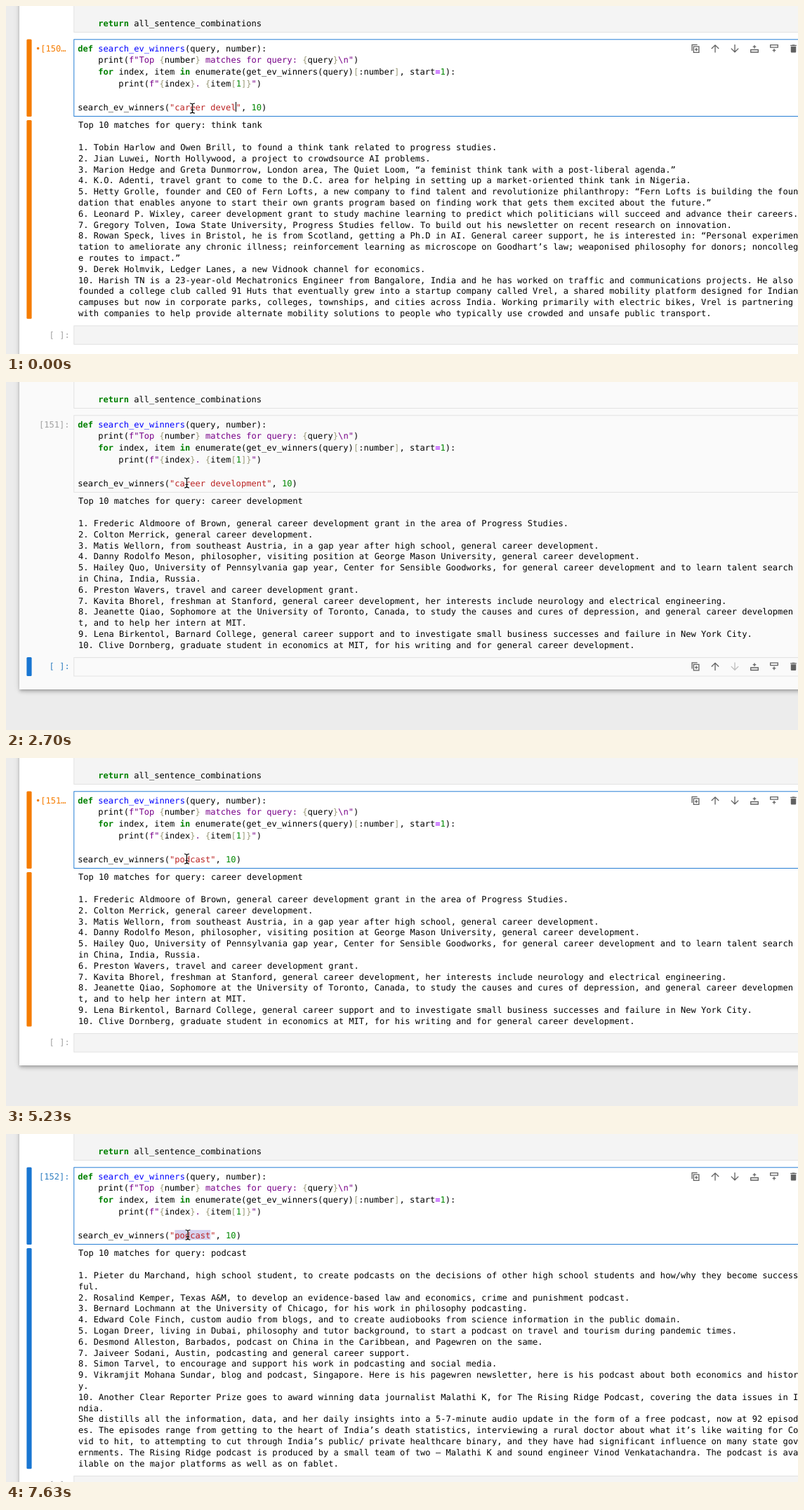
Write an HTML page that moves like this. It is 1128x497 px and loops after 8 s.

```html
<!DOCTYPE html>
<html lang="en">
<head>
<meta charset="utf-8">
<title>Notebook search</title>
<style>
html, body { margin: 0; width: 100%; height: 100%; overflow: hidden; background: #ececec; }
#stage { position: fixed; inset: 0; overflow: hidden; }
#panel {
  position: absolute; left: 19px; width: 100%; top: -30px; background: #fff;
  box-shadow: 0 2px 4px -1px rgba(0,0,0,.2), 0 4px 5px rgba(0,0,0,.14), 0 1px 9px rgba(0,0,0,.12);
}
svg { position: absolute; left: 0; top: 0; display: block; overflow: hidden; }
text {
  font: 12.08px "DejaVu Sans Mono", monospace; white-space: pre;
  text-rendering: geometricPrecision; fill: #000;
}
.kw { fill: #008000; font-weight: bold; }
.fn { fill: #00f; }
.fs { fill: #708; }
.br { fill: #997; }
.st { fill: #ba2121; }
.nu { fill: #080; }
.op { fill: #a2f; font-weight: bold; }
.cell { fill: #f4f4f4; stroke: #e0e0e0; stroke-width: .93; }
.cell.edit { fill: #fff; stroke: #1976d2; }
.pale #panel { background: #fafafa; }
.pale .cell { fill: #fafafa; }
.line { fill: none; stroke: #616161; stroke-width: 1.3; }
.solid { fill: #616161; }
</style>
</head>
<body>
<div id="stage">
<div id="panel"></div>
<svg width="1128" height="497" viewBox="0 0 1128 497">
  <rect class="cell" x="96.8" y="-20.5" width="1100" height="58"/>
  <rect class="cell" id="editor" x="96.8" y="47.8" width="1100" height="109.7"/>
  <rect class="cell" id="blank" x="96.8" width="1100" height="26.4"/>
  <rect id="codeBar" x="29.4" y="47.4" width="7.2" height="110.5" rx="1.5"/>
  <rect id="outBar" x="29.4" y="163" width="7.2" rx="1.5"/>
  <rect id="blankBar" x="29.4" width="7.2" height="27" rx="1.5" fill="#1976d2"/>
  <rect id="selection" y="137" height="14" fill="#d7d4f0"/>
  <g id="code"></g>
  <g id="output"></g>
  <text id="prompt" y="64.6"></text>
  <text id="blankPrompt" x="61.6">[ ]:</text>
  <g id="toolbar">
    <path class="line" transform="translate(982)" d="M-4.9 3.2V-5.4H2.6M-2.6-3H4.9V5.6H-2.6ZM1.2-.9V3.5M-1 1.3H3.4"/>
    <path class="line" d="M1010 5.7V-4.8M1004.8 .2 1010-5 1015.2 .2"/>
    <path class="line" id="down" d="M1038-5.7V4.8M1032.8-.2 1038 5 1043.2-.2"/>
    <path class="line" transform="translate(1066)" d="M-5.3 1.7H5.3V5.2H-5.3ZM0-4.9V-.3M-2.3-2.6H2.3"/>
    <path class="line" transform="translate(1094) scale(1 -1)" d="M-5.3 1.7H5.3V5.2H-5.3ZM0-4.9V-.3M-2.3-2.6H2.3"/>
    <path class="solid" transform="translate(1121.5 0) scale(.62) translate(-12 -12)"
      d="M6 19c0 1.1.9 2 2 2h8c1.1 0 2-.9 2-2V7H6v12zM19 4h-3.5l-1-1h-5l-1 1H5v2h14V4z"/>
  </g>
  <rect id="caret" y="137" width="1" height="14"/>
  <g id="mouse" fill="none">
    <path id="beamHalo" stroke="#fff" stroke-width="2.6" stroke-opacity=".7"/>
    <path id="beam" stroke="#000" stroke-width="1.2"/>
  </g>
</svg>
</div>
<script>
const LOOP = 8000, CODE_X = 102.2, CHAR = 12.08 * 1233 / 2048;
const CODE_STEP = 16.87, OUT_STEP = 15.8, QUERY_COL = 19;
const BLUE = '#1976d2', ORANGE = '#f57c00';
const $ = id => document.getElementById(id);
const set = (id, attrs) => {
  for (const key in attrs) $(id).setAttribute(key, attrs[key]);
};
const show = (id, on) => set(id, { visibility: on ? 'visible' : 'hidden' });
const tag = name => text => `<tspan class="${name}">${text}</tspan>`;
const [kw, fn, fs, br, nu, op] = ['kw', 'fn', 'fs', 'br', 'nu', 'op'].map(tag);
const slot = inner => br('{') + inner + br('}');

const results = [
`Top 10 matches for query: think tank

1. Tobin Harlow and Owen Brill, to found a think tank related to progress studies.
2. Jian Luwei, North Hollywood, a project to crowdsource AI problems.
3. Marion Hedge and Greta Dunmorrow, London area, The Quiet Loom, “a feminist think tank with a post-liberal agenda.”
4. K.O. Adenti, travel grant to come to the D.C. area for helping in setting up a market-oriented think tank in Nigeria.
5. Hetty Grolle, founder and CEO of Fern Lofts, a new company to find talent and revolutionize philanthropy: “Fern Lofts is building the foun
dation that enables anyone to start their own grants program based on finding work that gets them excited about the future.”
6. Leonard P. Wixley, career development grant to study machine learning to predict which politicians will succeed and advance their careers.
7. Gregory Tolven, Iowa State University, Progress Studies fellow. To build out his newsletter on recent research on innovation.
8. Rowan Speck, lives in Bristol, he is from Scotland, getting a Ph.D in AI. General career support, he is interested in: “Personal experimen
tation to ameliorate any chronic illness; reinforcement learning as microscope on Goodhart’s law; weaponised philosophy for donors; noncolleg
e routes to impact.”
9. Derek Holmvik, Ledger Lanes, a new Vidnook channel for economics.
10. Harish TN is a 23-year-old Mechatronics Engineer from Bangalore, India and he has worked on traffic and communications projects. He also
founded a college club called 91 Huts that eventually grew into a startup company called Vrel, a shared mobility platform designed for Indian
campuses but now in corporate parks, colleges, townships, and cities across India. Working primarily with electric bikes, Vrel is partnering
with companies to help provide alternate mobility solutions to people who typically use crowded and unsafe public transport.`,
`Top 10 matches for query: career development

1. Frederic Aldmoore of Brown, general career development grant in the area of Progress Studies.
2. Colton Merrick, general career development.
3. Matis Wellorn, from southeast Austria, in a gap year after high school, general career development.
4. Danny Rodolfo Meson, philosopher, visiting position at George Mason University, general career development.
5. Hailey Quo, University of Pennsylvania gap year, Center for Sensible Goodworks, for general career development and to learn talent search
in China, India, Russia.
6. Preston Wavers, travel and career development grant.
7. Kavita Bhorel, freshman at Stanford, general career development, her interests include neurology and electrical engineering.
8. Jeanette Qiao, Sophomore at the University of Toronto, Canada, to study the causes and cures of depression, and general career developmen
t, and to help her intern at MIT.
9. Lena Birkentol, Barnard College, general career support and to investigate small business successes and failure in New York City.
10. Clive Dornberg, graduate student in economics at MIT, for his writing and for general career development.`,
`Top 10 matches for query: podcast

1. Pieter du Marchand, high school student, to create podcasts on the decisions of other high school students and how/why they become success
ful.
2. Rosalind Kemper, Texas A&M, to develop an evidence-based law and economics, crime and punishment podcast.
3. Bernard Lochmann at the University of Chicago, for his work in philosophy podcasting.
4. Edward Cole Finch, custom audio from blogs, and to create audiobooks from science information in the public domain.
5. Logan Dreer, living in Dubai, philosophy and tutor background, to start a podcast on travel and tourism during pandemic times.
6. Desmond Alleston, Barbados, podcast on China in the Caribbean, and Pagewren on the same.
7. Jaiveer Sodani, Austin, podcasting and general career support.
8. Simon Tarvel, to encourage and support his work in podcasting and social media.
9. Vikramjit Mohana Sundar, blog and podcast, Singapore. Here is his pagewren newsletter, here is his podcast about both economics and histor
y.
10. Another Clear Reporter Prize goes to award winning data journalist Malathi K, for The Rising Ridge Podcast, covering the data issues in I
ndia.
She distills all the information, data, and her daily insights into a 5-7-minute audio update in the form of a free podcast, now at 92 episod
es. The episodes range from getting to the heart of India’s death statistics, interviewing a rural doctor about what it’s like waiting for Co
vid to hit, to attempting to cut through India’s public/ private healthcare binary, and they have had significant influence on many state gov
ernments. The Rising Ridge podcast is produced by a small team of two – Malathi K and sound engineer Vinod Venkatachandra. The podcast is ava
ilable on the major platforms as well as on fablet.`
].map(text => text.split('\n'));

const codeLines = [
  [28.8, '    ' + kw('return') + ' all_sentence_combinations'],
  ...[
    kw('def') + ' ' + fn('search_ev_winners') + '(query, number):',
    '    print(' + fs('f"Top ') + slot('number') + fs(' matches for query: ') + slot('query') + fs('\\n"') + ')',
    '    ' + kw('for') + ' index, item ' + kw('in') + ' enumerate(get_ev_winners(query)' + br('[') + ':number' + br(']') +
      ', start' + op('=') + nu('1') + '):',
    '        print(' + fs('f"') + slot('index') + fs('. ') + slot('item' + br('[') + nu('1') + br(']')) + fs('"') + ')',
    '',
    'search_ev_winners(<tspan class="st" id="query"></tspan>, ' + nu('10') + ')'
  ].map((line, row) => [64.6 + row * CODE_STEP, line])
];
$('code').innerHTML = codeLines.map(([y, line]) => `<text x="${CODE_X}" y="${y}">${line}</text>`).join('');

const beamPath = 'M-3.5-7Q0-7 0-5V5Q0 7 3.5 7M3.5-7Q0-7 0-5M0 5Q0 7-3.5 7M-2 2.5H2';
set('beam', { d: beamPath });
set('beamHalo', { d: beamPath });

// Each step changes only the listed fields and keeps the rest.
const typed = (word, n) => ({ query: word.slice(0, n), caret: n, selected: 0 });
const moved = (x, y) => ({ x, y });
const ran = (count, out) => ({ count, out, editing: false, dirty: false, caret: -1 });
const CAREER = 'career development', PODCAST = 'podcast';
const steps = [
  [0, { count: 150, out: 0, editing: true, dirty: true, ...typed(CAREER, 12), ...moved(265.5, 146) }],
  [150, typed(CAREER, 13)],
  [300, typed(CAREER, 15)],
  [450, typed(CAREER, 16)],
  [600, typed(CAREER, 18)],
  [1050, ran(151, 1)],
  ...[1, 2, 3, 4, 5, 6].map(i => [1800 + 150 * i, { pale: true, ...moved(265.5 - 8 * i / 6, 146 - 2 * i / 6) }]),
  [2850, { pale: false, editing: true, caret: 0 }],
  [3000, { selected: 6, caret: 6 }],
  [3140, { selected: 18, caret: 18, ...moved(259, 144) }],
  [3440, moved(257.5, 144)],
  [3740, { dirty: true, ...typed(PODCAST, 1) }],
  [4040, typed(PODCAST, 2)],
  [4190, typed(PODCAST, 3)],
  [4340, typed(PODCAST, 4)],
  [4480, typed(PODCAST, 6)],
  [4630, typed(PODCAST, 7)],
  [5230, { caret: -1 }],
  [5680, ran(152, 2)],
  [6280, moved(254.5, 148)],
  [6430, moved(256, 151)],
  [6580, moved(257.5, 145)],
  [6880, { editing: true, caret: 3 }],
  [7030, { selected: 7, caret: 7, ...moved(259, 144) }],
  [7630, { caret: -1 }]
];

let shownOut = -1;
function drawOutput(index) {
  if (index === shownOut) return;
  shownOut = index;
  $('output').replaceChildren(...results[index].map((line, row) => {
    const text = document.createElementNS('http://www.w3.org/2000/svg', 'text');
    text.setAttribute('x', 102.9);
    text.setAttribute('y', 174.4 + row * OUT_STEP);
    text.textContent = line;
    return text;
  }));
}

function draw(s) {
  const outBottom = 162.3 + results[s.out].length * OUT_STEP;
  const blankTop = outBottom + 9.6;
  const accent = s.dirty ? ORANGE : BLUE;
  const columnX = n => CODE_X + (QUERY_COL + n) * CHAR;

  drawOutput(s.out);
  $('stage').className = s.pale ? 'pale' : '';
  $('panel').style.height = outBottom + 85.2 + 'px';
  set('editor', { class: s.editing ? 'cell edit' : 'cell' });
  set('blank', { y: blankTop + .5 });
  set('codeBar', { fill: accent });
  set('outBar', { fill: accent, height: outBottom - 163 });
  set('blankBar', { y: blankTop });
  show('codeBar', s.editing);
  show('outBar', s.editing);
  show('blankBar', !s.editing);

  $('prompt').textContent = s.dirty ? `•[${s.count}…` : `[${s.count}]:`;
  set('prompt', { x: s.dirty ? 42 : 47 });
  $('prompt').style.fill = s.dirty ? ORANGE : s.editing ? '#307fc1' : '#a0a0a0';
  set('blankPrompt', { y: blankTop + 17.2 });
  $('blankPrompt').style.fill = s.editing ? '#a0a0a0' : '#307fc1';

  set('toolbar', { transform: `translate(0 ${s.editing ? 60.8 : blankTop + 13.2})` });
  $('down').style.stroke = s.editing ? '' : '#bdbdbd';

  $('query').textContent = `"${s.query}"`;
  set('selection', { x: columnX(0), width: s.selected * CHAR });
  show('selection', s.editing && s.selected > 0);
  set('caret', { x: Math.floor(columnX(Math.max(s.caret, 0))) });
  show('caret', s.caret >= 0);
  set('mouse', { transform: `translate(${s.x} ${s.y})` });
}

const start = performance.now();
let shownStep = -1;
function tick() {
  const time = (performance.now() - start) % LOOP;
  const count = steps.filter(([at]) => at <= time).length;
  if (count !== shownStep) {
    shownStep = count;
    draw(Object.assign({}, ...steps.slice(0, count).map(([, change]) => change)));
  }
  requestAnimationFrame(tick);
}
tick();
</script>
</body>
</html>
```
